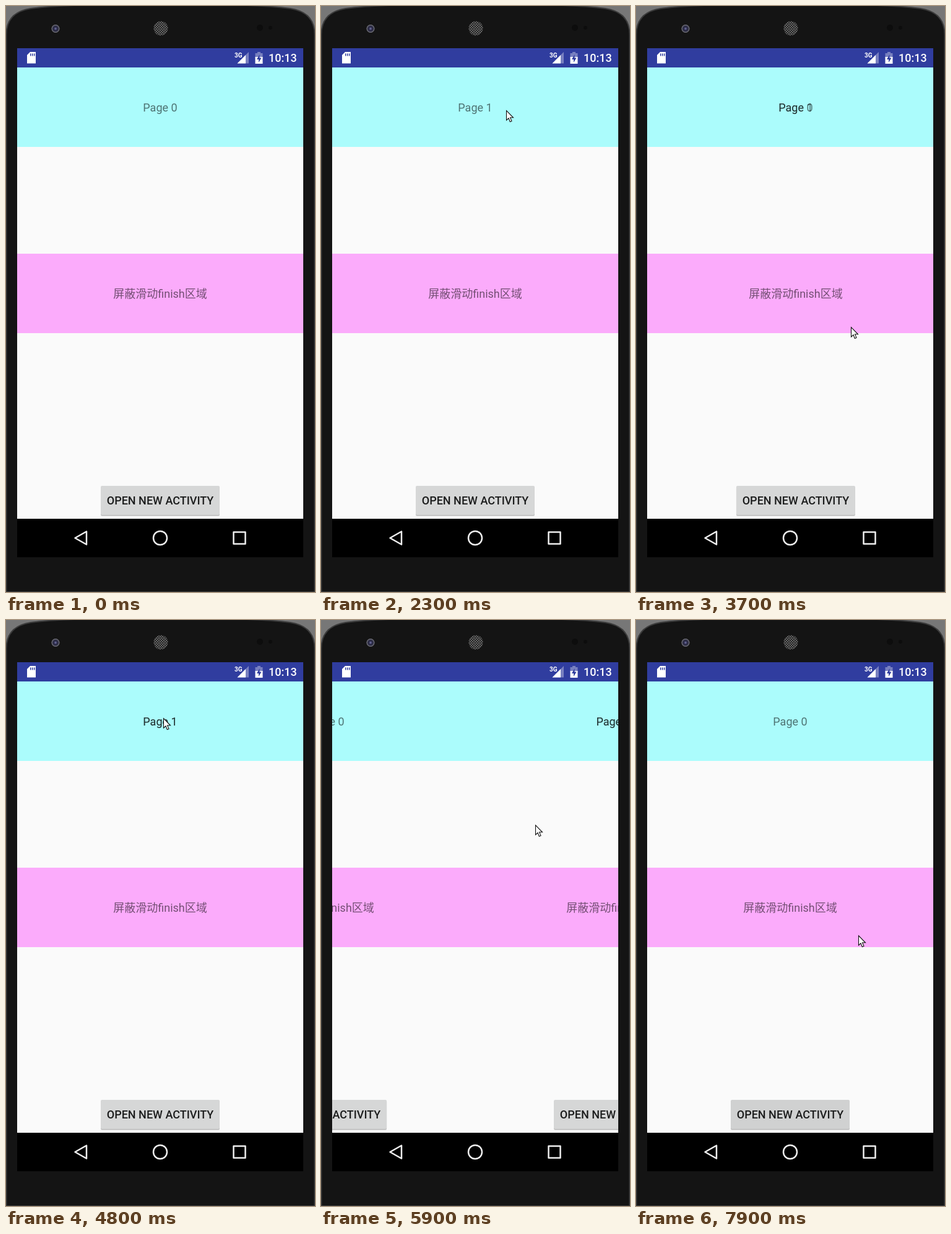
Recreate the animation shown at these times as an HTML page. Size 499 px wide and 944 px high, loop 8 s.

```html
<!DOCTYPE html>
<html lang="zh-CN">
<head>
<meta charset="utf-8">
<title>Swipe back</title>
<style>
  html, body { margin: 0; width: 100%; height: 100%; overflow: hidden; background: #141414; }
  svg { display: block; }
  text { font: 18px Roboto, "Noto Sans CJK SC", "Noto Sans CJK", sans-serif; }
  .label { fill: rgba(0, 0, 0, .54); text-anchor: middle; }
  .button { fill: #1b1c1c; font-weight: 500; text-anchor: middle; }
  .clock { fill: #fff; font-weight: 500; }
  .network { fill: #fff; font-size: 10px; font-weight: 700; }
</style>
</head>
<body>
<svg width="499" height="944" viewBox="0 0 499 944">
  <defs>
    <pattern id="mesh" width="4" height="4" patternUnits="userSpaceOnUse">
      <rect width="4" height="4" fill="#666"/>
      <circle cx="1" cy="1" r="1.1" fill="#191919"/>
      <circle cx="3" cy="3" r="1.1" fill="#191919"/>
    </pattern>
    <radialGradient id="lens">
      <stop offset="0" stop-color="#7777ad"/>
      <stop offset=".45" stop-color="#25253f"/>
      <stop offset=".7" stop-color="#34344a"/>
      <stop offset="1" stop-color="#8b8b8f"/>
    </radialGradient>
  </defs>

  <!-- Phone body -->
  <rect width="499" height="944" fill="#777"/>
  <path d="M.5 944V46Q.5 10 40 4Q70 0 110-1H389Q429 0 459 4Q498.5 10 498.5 46V944Z" fill="#141414" stroke="#3c3c3c" stroke-width="2"/>
  <circle cx="80" cy="36.5" r="6.5" fill="url(#lens)"/>
  <circle cx="250" cy="36" r="11.5" fill="url(#mesh)"/>
  <circle cx="410" cy="35" r="5" fill="#0d0d0d"/>
  <circle cx="427" cy="35" r="3" fill="#0d0d0d"/>

  <!-- Screen -->
  <rect x="18" y="68" width="462" height="820" fill="#fafafa"/>
  <rect x="18" y="99" width="462" height="128" fill="#abfcfc"/>
  <rect x="18" y="399" width="462" height="128" fill="#fbabfb"/>
  <svg id="activities" x="18" y="99" width="462" height="727" viewBox="0 99 462 727"></svg>

  <!-- Status bar -->
  <rect x="18" y="68" width="462" height="31" fill="#303d9f"/>
  <path d="M39 74H48V92.500H34V79Z" fill="#fff"/>
  <path d="M39.800 76.500v4m3-4v4m3-4v4" stroke="#303d9f" stroke-width="1.5"/>
  <text class="network" x="369" y="82.500">3G</text>
  <path d="M373.500 92.500L392 74V92.500Z" fill="#fff" opacity=".35"/>
  <path d="M373.500 92.500L387 79V92.500Z" fill="#fff"/>
  <path d="M402.500 76H406V74H411V76H414.500V84H402.500Z" fill="#fff" opacity=".35"/>
  <path d="M402.500 82H414.500V93H402.500Z" fill="#fff"/>
  <path d="M409.500 78L405 86H408V91L412.500 83.500H409.500Z" fill="#303d9f"/>
  <text class="clock" x="424" y="90">10:13</text>

  <!-- Navigation bar -->
  <rect x="18" y="826" width="462" height="62" fill="#000"/>
  <g fill="none" stroke="#eee" stroke-width="2.5" stroke-linejoin="round">
    <path d="M111.500 857L130 846.500V867.500Z"/>
    <circle cx="249" cy="857" r="11"/>
    <rect x="367.5" y="847.5" width="19" height="19"/>
  </g>

  <path id="cursor" d="M.5.5V16L4 12.800L6.300 18.500L9 17.400L6.600 11.800H11.500Z" fill="#fff" stroke="#111" stroke-width="1.1"/>
</svg>

<script>
const DURATION = 8000, STEP = 100, WIDTH = 462;

const activityMarkup = `<g>
  <g class="pager">
    <text class="label" x="231" y="170">Page 0</text>
    <text class="label" x="${231 + WIDTH}" y="170">Page 1</text>
  </g>
  <text class="label" x="231" y="469.5">屏蔽滑动finish区域</text>
  <rect x="135" y="775" width="192" height="47" rx="2" fill="#000" opacity=".1"/>
  <rect x="135" y="774" width="192" height="47" rx="2" fill="#000" opacity=".2"/>
  <rect class="face" x="135" y="773" width="192" height="47" rx="2"/>
  <text class="button" x="231" y="803">OPEN NEW ACTIVITY</text>
</g>`;

const stage = document.getElementById('activities');
stage.innerHTML = activityMarkup + activityMarkup;
const [first, second] = stage.children;
const cursor = document.getElementById('cursor');

// Pointer gestures as [time, x, y] points.
const approach = [[500, 245, 500], [600, 236, 375], [800, 190, 232], [900, 187, 200], [1200, 433, 172]];
const firstSwipes = [[1300, 433, 172], [1800, 200, 164], [2300, 299, 168], [2600, 425, 173]];
const toButton = [[2800, 335, 308], [2900, 315, 653], [3100, 276, 799], [3300, 276, 799]];
const toStrip = [[3500, 355, 703], [3700, 347, 517], [4100, 415, 185]];
const secondSwipes = [[4600, 225, 140], [4800, 254, 158], [5100, 400, 175], [5400, 220, 164], [5600, 410, 190]];
const release = [[5800, 361, 288], [5900, 346, 330], [6300, 311, 464], [6500, 400, 445], [6800, 490, 157]];
const backToButton = [[7100, 375, 590], [7200, 338, 709], [7400, 275, 795], [7600, 275, 795], [7800, 376, 615], [7900, 359, 508]];
const cursorPath = [approach, firstSwipes, toButton, toStrip, secondSwipes, release, backToButton].flat();

function pointAt(path, time) {
  const next = path.findIndex(point => point[0] >= time);
  if (next <= 0) return path[0].slice(1);
  const [t0, x0, y0] = path[next - 1], [t1, x1, y1] = path[next];
  const part = (time - t0) / (t1 - t0);
  return [x0 + (x1 - x0) * part, y0 + (y1 - y0) * part];
}

const progress = (time, from, to) => Math.min(1, Math.max(0, (time - from) / (to - from)));
const smooth = (time, from, to) => {
  const p = progress(time, from, to);
  return p * p * (3 - 2 * p);
};
const move = (node, x, y = 0) => node.setAttribute('transform', `translate(${x} ${y})`);

function drawActivity(node, x, page, press) {
  move(node, x);
  move(node.querySelector('.pager'), -page * WIDTH);
  const shade = 214 - 6 * press;
  node.querySelector('.face').setAttribute('fill', `rgb(${shade} ${shade + 1} ${shade + 1})`);
}

function draw(now) {
  const time = Math.min(Math.floor(now % DURATION / STEP) * STEP, 7900);
  const closed = (1 - progress(time, 3300, 3800)) ** 2.45 + smooth(time, 5558, 6258);
  const x = closed * WIDTH;
  const firstPage = smooth(time, 1350, 2150) - smooth(time, 2300, 2900);
  const secondPage = smooth(time, 4150, 4800) - smooth(time, 4850, 5400);
  const press = progress(time, 3200, 3400) - progress(time, 3400, 3700) + progress(time, 7500, 7700);
  drawActivity(first, x - WIDTH, firstPage, press);
  drawActivity(second, x, secondPage, 0);
  move(cursor, ...pointAt(cursorPath, time));
  cursor.style.visibility = time < 500 ? 'hidden' : 'visible';
}

const start = performance.now();
function frame() {
  draw(performance.now() - start);
  requestAnimationFrame(frame);
}
frame();
</script>
</body>
</html>
```
